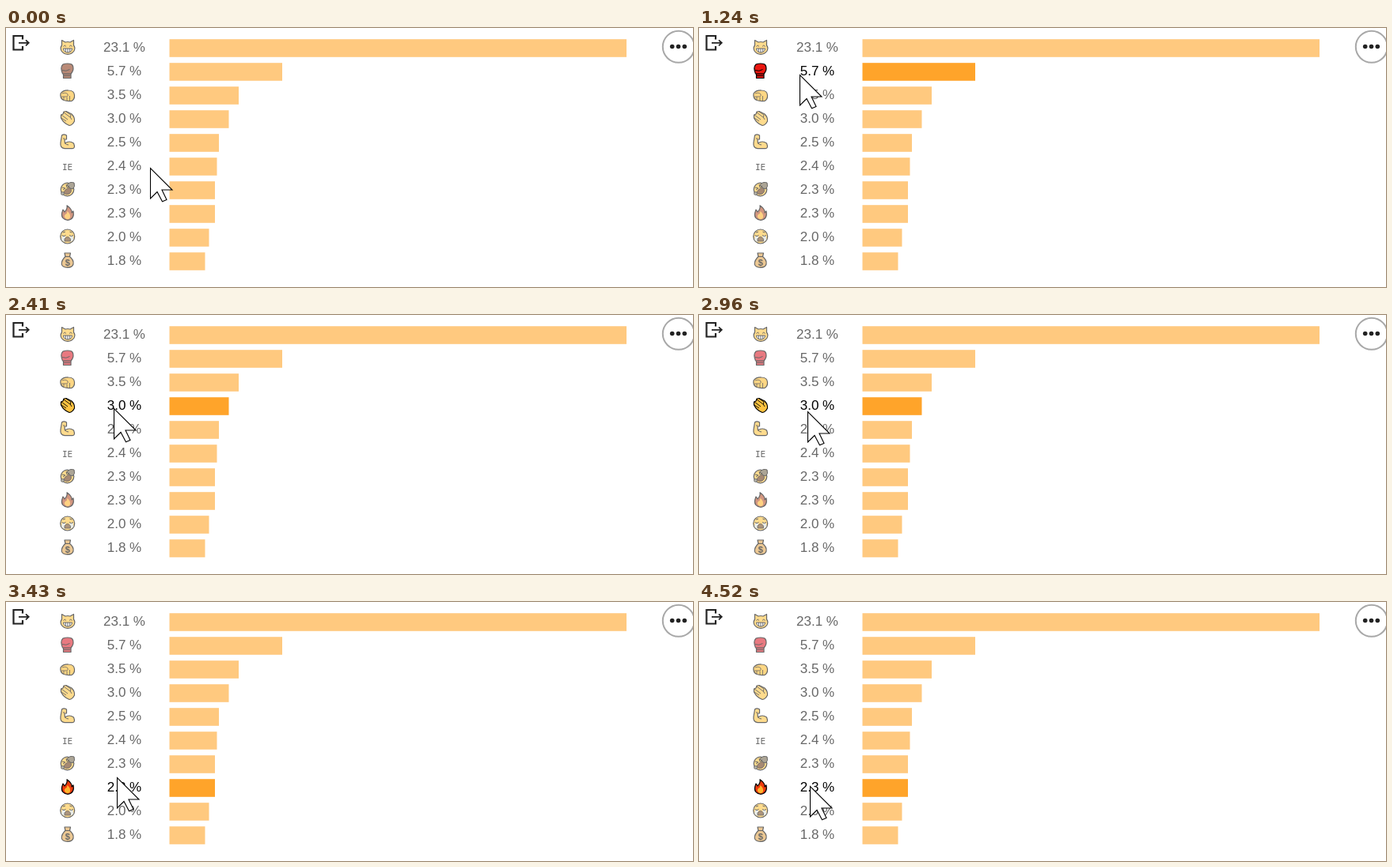
Animation, 868 px wide and 328 px high, one loop 4820 ms. Source, as an HTML page with a canvas:

```html
<!DOCTYPE html>
<html lang="en">
<head>
<meta charset="utf-8">
<title>Emoji share chart</title>
<style>
  html, body { margin: 0; width: 100%; height: 100%; overflow: hidden; background: #fff; }
  canvas { display: block; }
</style>
</head>
<body>
<canvas id="stage" width="868" height="328"></canvas>
<script>
const ctx = document.getElementById('stage').getContext('2d');
const LOOP = 4820;
const ROW = 30;
const SHARES = [23.1, 5.7, 3.5, 3.0, 2.5, 2.4, 2.3, 2.3, 2.0, 1.8];
const YELLOW = '#ffc341', INK = '#000';

// Pointer moves: start, end, number of steps, then the first and last tip
const MOVES = [
  [160, 460, 5, 172, 154, 127, 53],
  [1240, 1480, 4, 127, 59, 130, 80],
  [1790, 1940, 3, 131, 86, 136, 125],
  [2410, 2580, 3, 136, 118, 137, 120],
  [2960, 3200, 4, 137, 122, 140, 172],
  [3270, 3430, 3, 140, 189, 140, 222],
  [4130, 4520, 6, 140, 206, 140, 233]
];

function pointerAt(t) {
  let pos = [182, 177];
  for (const [start, end, steps, x0, y0, x1, y1] of MOVES) {
    if (t < start) break;
    const last = steps - 1;
    const k = Math.min(last, Math.floor((t - start) / (end - start) * last + 0.07)) / last;
    pos = [Math.round(x0 + (x1 - x0) * k), Math.round(y0 + (y1 - y0) * k)];
  }
  return pos;
}

function litRow([x, y]) {
  return x < 176 ? Math.floor((y - 4) / ROW) : -1;
}

function shape(d, fill, width = 1.2, stroke = INK) {
  const path = new Path2D(d);
  if (fill) {
    ctx.fillStyle = fill;
    ctx.fill(path);
  }
  if (width) {
    ctx.lineWidth = width;
    ctx.strokeStyle = stroke;
    ctx.stroke(path);
  }
}

function disc(x, y, r, fill, width = 1.2, stroke = INK) {
  ctx.beginPath();
  ctx.arc(x, y, r, 0, Math.PI * 2);
  ctx.fillStyle = fill;
  ctx.fill();
  if (width) {
    ctx.lineWidth = width;
    ctx.strokeStyle = stroke;
    ctx.stroke();
  }
}

function label(text, x, y, font) {
  ctx.font = font;
  ctx.textAlign = 'center';
  ctx.fillStyle = INK;
  ctx.fillText(text, x, y);
}

// Each icon is drawn on a 20 by 20 grid
const ICONS = [
  function cat() {
    shape('M2.5 8V1.5L7 4Q10 3 13 4L17.5 1.5V8Q20 11 18 15Q15 19.3 10 19.3Q5 19.3 2 15Q0 11 2.5 8Z', YELLOW);
    shape('M4.5 12H15.5Q15 17 10 17Q5 17 4.5 12Z', '#fff', 1);
    shape('M7.3 12V16M10 12V17M12.7 12V16M4.5 9.5Q6.3 6.5 8 9.5M12 9.5Q13.7 6.5 15.5 9.5', null, 1);
  },
  function glove(lit, t) {
    const red = t < 390 && !lit ? '#8a3c1c' : lit ? '#ea1710' : '#d8202c';
    shape('M4.5 14H14V19.5H4.5Z', red);
    shape('M3.5 14Q0 6 4 2Q10 0 15 2Q18 5 16.5 10Q15.5 12.5 14 14Z', red);
    shape('M3 9.5Q8 11.5 12.5 8.5M5 16.5H13.5', null, 1);
  },
  function fist() {
    shape('M1 9Q4 4.5 11 5Q18 5 18.5 11Q19 16 15 18.5Q9 19 5 17.5Q0 15 1 9Z', '#fdbb30');
    shape('M3 9Q8 7 10 10Q11 13 7 13H2M5 13V17M9 13.5V18M12.5 12V18', null, 0.8);
  },
  function clap() {
    shape('M1.5 6L4 5L5 2L8 1.5L15 5Q19 9 18.5 14Q16 19 12 19.5Q5 17 1.5 10Z', YELLOW);
    shape('M5 3L13 9M2 6L10 12M2 10L8 14M8 2L14 6Q12 9 15 12', null, 0.9);
  },
  function biceps() {
    shape('M2.5 2Q5 -0.2 8.5 2V7H6L6.5 12Q12 8 17.5 12Q20 18.5 16 18.7H6Q0 18 1 11Z', YELLOW);
    shape('M4 6H6M6.5 12Q8 14 11 14', null, 1);
  },
  function letters() {
    label('IE', 9.5, 16, '11px "DejaVu Sans Mono", monospace');
  },
  function laugh() {
    disc(9.5, 10.5, 8.3, YELLOW);
    shape('M5 15Q6 10 12 8Q17 12 12 16Q8 18 5 15Z', '#6b3b16', 0.8);
    shape('M9 5Q12 0 18 2Q20 7 16 10Q13 10 9 5Z', '#75684f', 1);
    shape('M3 8L7 9L4 11M8 4L9 8L12 6', null, 1);
    disc(3.5, 15.5, 2, '#7e7b6c', 0.8);
  },
  function flame(lit) {
    shape('M9 0.8Q16 6 15 10L17 8Q19 18 10 19.3Q1 18 2.7 10L4 6L6 9Q10 5 9 0.8Z', lit ? '#ee3c0e' : '#b34f2b');
    shape('M9.5 8Q14 12 13 16Q11.5 19 8.5 18Q4 15 7 12Q9.5 11 9.5 8Z', '#ffb42e', 0);
  },
  function cry() {
    disc(9.7, 10, 9, YELLOW);
    shape('M3 9H7V17Q4 17 2 14ZM12.4 9H16.4L17.4 14Q15 17 12.4 17Z', '#d9dfd8', 0);
    shape('M6 13Q9.7 8 13.4 13V16H6Z', '#754c24', 0.8);
    shape('M2.5 8.5Q5 11 7.5 8.5M12 8.5Q14.5 11 17 8.5M4 5L7 4M12.4 4L15.4 5', null, 1);
  },
  function bag() {
    shape('M6 1H13.5L12.5 5.5Q18 10 17 15Q16 19.3 9.7 19.3Q3 19.3 2.3 15Q2 10 7 5.5Z', '#dda24b');
    shape('M6.5 5.5H13', null, 1);
    label('$', 9.7, 16.5, 'bold 11px "Liberation Sans", Arial, sans-serif');
  }
];

function drawRow(i, lit, t) {
  const y = i * ROW;
  ctx.save();
  ctx.translate(68, y + 14);
  ICONS[i](lit, t);
  ctx.restore();
  label(SHARES[i].toFixed(1) + ' %', 149.5, y + 30, '17px "Liberation Sans", Arial, sans-serif');
  ctx.fillStyle = '#ffa42a';
  ctx.fillRect(206.5, y + 14.2, SHARES[i] * 25, 22.6);
  if (!lit) {
    ctx.fillStyle = 'rgba(255,255,255,0.4)';
    ctx.fillRect(60, y + 11, 740, ROW);
  }
}

function drawControls() {
  ctx.lineJoin = 'miter';
  shape('M21 14.5V10H9.5V27.5H21V23', null, 2.2, '#222');
  shape('M16 18.8H28.5M25 15.3L28.7 18.8L25 22.3', null, 1.8, '#222');
  disc(849.8, 23.8, 20, '#fff', 2, '#a8a8a8');
  for (const x of [841.7, 849.5, 857.3]) disc(x, 23.5, 2.8, '#222', 0);
}

function drawPointer([x, y]) {
  ctx.save();
  ctx.translate(x + 0.5, y + 0.5);
  shape('M0 0V38.5L8.5 30L15 42.3L20.5 40L14.5 27.5H27.5Z', '#fff', 1.1);
  ctx.restore();
}

function draw(t) {
  const pos = pointerAt(t);
  const lit = litRow(pos);
  ctx.fillStyle = '#fff';
  ctx.fillRect(0, 0, 868, 328);
  ctx.lineJoin = 'round';
  SHARES.forEach((share, i) => drawRow(i, i === lit, t));
  drawControls();
  drawPointer(pos);
}

const began = performance.now();
function tick() {
  draw((performance.now() - began) % LOOP);
  requestAnimationFrame(tick);
}
tick();
</script>
</body>
</html>
```
